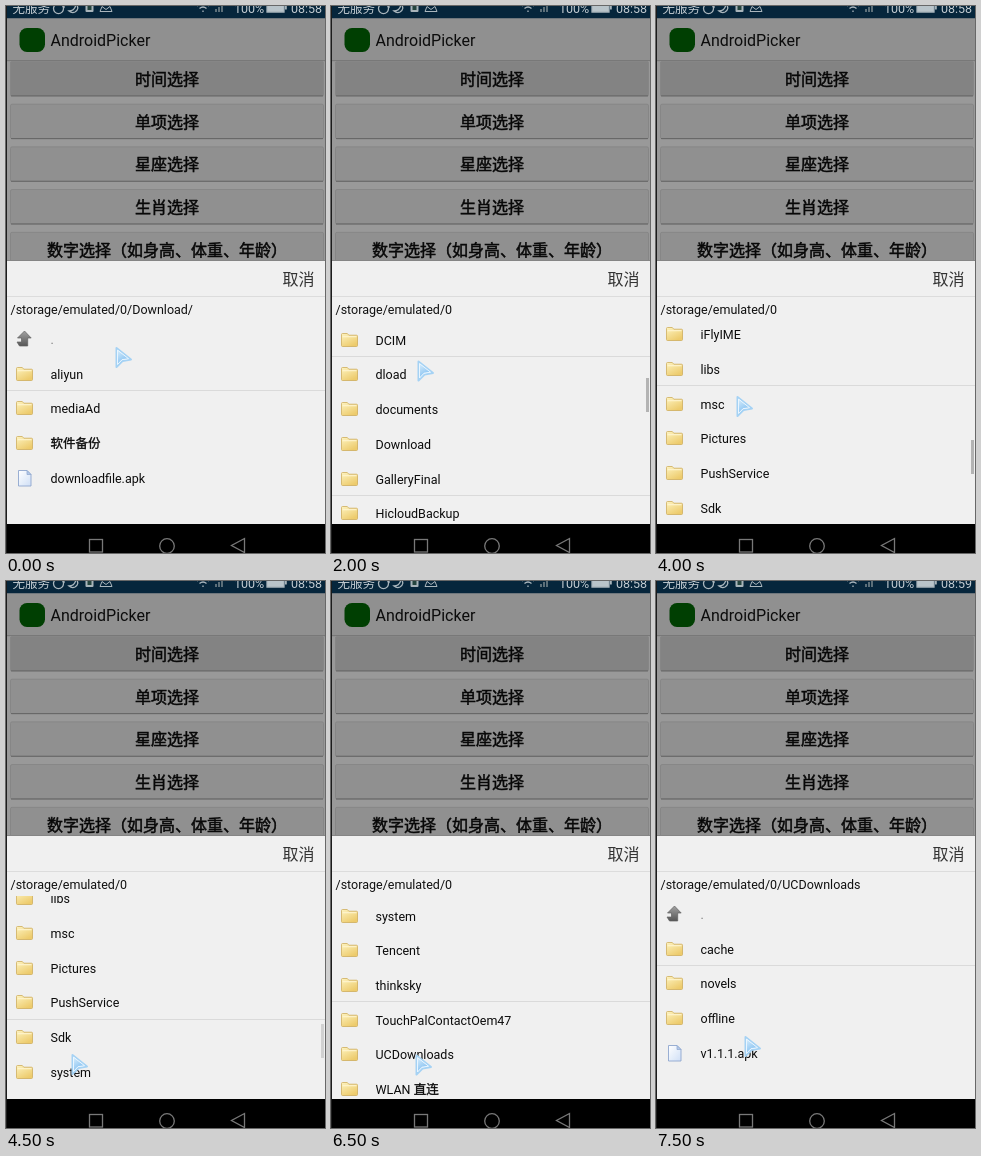
An HTML page for the animation above (8000 ms loop, 319 by 547 pixels).

```html
<!DOCTYPE html>
<html lang="zh-CN">
<head>
<meta charset="utf-8">
<title>File picker</title>
<style>
  html, body { margin: 0; width: 100%; height: 100%; overflow: hidden; background: #000; }
  svg { display: block; width: 319px; height: 547px; }
  text { font-family: Roboto, "Noto Sans CJK SC", "Noto Sans CJK", sans-serif; font-size: 12.5px; }
  .btn text { font-size: 16px; text-anchor: middle; fill: #080808; stroke: #080808; stroke-width: .5px; }
  .btn tspan { font-family: "Noto Sans CJK TC", "Noto Sans CJK", sans-serif; }
  .status text { fill: #c3ccd2; }
  .cjk { stroke: #0c0c0c; stroke-width: .35px; }
</style>
</head>
<body>
<svg id="stage" viewBox="0 0 319 547" xmlns="http://www.w3.org/2000/svg">
  <defs>
    <linearGradient id="gold" x1="0" y1="0" x2="0.6" y2="1">
      <stop offset="0" stop-color="#fdf3c0"/><stop offset="1" stop-color="#edcb6c"/>
    </linearGradient>
    <linearGradient id="page" x1="0" y1="0" x2="1" y2="1">
      <stop offset="0" stop-color="#fff"/><stop offset="1" stop-color="#cfdff6"/>
    </linearGradient>
    <linearGradient id="steel" x1="0" y1="0" x2="0" y2="1">
      <stop offset="0" stop-color="#a2a2a2"/><stop offset="1" stop-color="#565656"/>
    </linearGradient>
    <linearGradient id="ice" x1="0" y1="0" x2=".5" y2="1">
      <stop offset="0" stop-color="#d9eefc"/><stop offset="1" stop-color="#7fbdf0"/>
    </linearGradient>
    <clipPath id="listBox"><rect x="1" y="315" width="318" height="203"/></clipPath>
    <g id="folder">
      <path d="M10.500 -5.500q0 -1 1 -1h4.800l1.500 1.700h7.700q1 0 1 1v9.300q0 1 -1 1h-14q-1 0 -1 -1z" fill="url(#gold)" stroke="#cfae5e" stroke-width=".8"/>
      <path d="M11.500 -3.300h14" stroke="#fff6d2" stroke-width="1"/>
    </g>
    <g id="file">
      <path d="M12.500 -7.500h8.500l4 4v11.500h-12.500z" fill="url(#page)" stroke="#8fa6cf" stroke-width=".9"/>
      <path d="M21 -7.500v4h4z" fill="#b4c8ea" stroke="#8fa6cf" stroke-width=".7"/>
    </g>
    <g id="up">
      <path d="M18.500 -8l6.700 7h-3.500v8h-8.200l-2.500 -4h4.500v-4h-4z" fill="url(#steel)" stroke="#606060" stroke-width=".7"/>
    </g>
  </defs>

  <rect width="319" height="547" fill="#999"/>
  <g class="status">
    <rect width="319" height="12.500" fill="#06263c"/>
    <text x="6.500" y="7.300">无服务</text>
    <g fill="none" stroke="#aab6bd" stroke-width="1.300">
      <path d="M56 -1a5 5 0 1 1 -7 0M55 -1h3v3"/>
      <path d="M70 -2q4 5 -1 8q-3 1.500 -6 -1q6 0 7 -7z"/>
      <path d="M94 5.500l2 -5l4 3l4 -3l2 5z" stroke-width="1"/>
      <path d="M191 0q6 -5 12 0M193.500 2.500q3.500 -3 7 0M197 4.500v1.500"/>
      <path d="M261 -3h17v9h-17z" fill="#b9c4ca"/>
    </g>
    <rect x="79.500" y="-3" width="8" height="9" rx="1" fill="#a8b4ba"/>
    <rect x="81.500" y="0" width="4" height="4" fill="#25453f"/>
    <path d="M209 6v-3h2v3zm3 0v-5h2v5zm3 0v-8h2v8z" fill="#5c6f79"/>
    <rect x="279" y="0" width="1.800" height="3.500" fill="#a9b5bb"/>
    <text x="228" y="7">100%</text>
    <text id="clock" x="285" y="7">08:58</text>
  </g>

  <rect y="12.500" width="319" height="42" fill="#909090"/>
  <rect y="54" width="319" height="1.200" fill="#787878"/>
  <rect x="13.500" y="22" width="25.500" height="24" rx="7.500" fill="#003f02"/>
  <text x="44.500" y="40" style="font-size:16px" fill="#0c0c0c">AndroidPicker</text>
  <g class="btn" id="buttons"></g>

  <rect y="254" width="319" height="1" fill="#858585"/>
  <rect y="255" width="319" height="263" fill="#f0f0f0"/>
  <rect y="290" width="319" height="1" fill="#dcdcdc"/>
  <text x="276.500" y="279.300" style="font-size:16px" fill="#333">取消</text>
  <text id="path" x="4.500" y="307.800" fill="#111"></text>
  <g id="list" clip-path="url(#listBox)"></g>
  <rect id="thumb" x="315" width="3" height="34" fill="#b3b3b3"/>

  <rect y="518" width="319" height="29" fill="#000"/>
  <g fill="none" stroke="#787878" stroke-width="1.300">
    <rect x="83.500" y="533.500" width="13" height="12.500"/>
    <circle cx="161" cy="540" r="7.300"/>
    <path d="M238.500 532.500v14l-13 -7z"/>
  </g>
  <rect width="1" height="547" fill="#1c1c1c"/>

  <g id="cursor" stroke-linejoin="round">
    <path d="M1.500 1L16 12.500L7.500 14L1.500 20z" fill="#fff" stroke="#a5d2f4" stroke-width="2"/>
    <path d="M2.500 3L13.500 11.700L7 12.700L2.500 17.500z" fill="url(#ice)" stroke="#eef8ff" stroke-width=".9"/>
  </g>
</svg>
<script>
const $ = id => document.getElementById(id);
const ROW = 34.72, FIRST = 333, STEP = 500, LOOP = 8000;

const root = "/storage/emulated/0";
const folders = {
  download: { path: root + "/Download/", rows: [".", "aliyun", "mediaAd", "软件备份", "downloadfile.apk"] },
  home: { path: root, rows: [".", "Alarms", "Android", "backup", "Books", "cache", "CloudDrive", "data",
    "DCIM", "dload", "documents", "Download", "GalleryFinal", "HicloudBackup", "Hotspot", "HWThemes",
    "IbikeNavigator", "iFlyIME", "libs", "msc", "Pictures", "PushService", "Sdk", "system", "Tencent",
    "thinksky", "TouchPalContactOem47", "UCDownloads", "WLAN 直连"] },
  uc: { path: root + "/UCDownloads", rows: [".", "cache", "novels", "offline", "v1.1.1.apk"] }
};

// folder, scroll, first divider y, scrollbar opacity, cursor x, cursor y
const steps = [
  ["download", 0, 384, 0, 109, 341],
  ["home", 0, 384, 0, 109, 341],
  ["home", 0, 384, 0, 84, 428],
  ["home", 130, 358, 1, 85, 350],
  ["home", 277, 350, 1, 86, 354.5],
  ["home", 455, 346, 1, 95, 400],
  ["home", 514.3, 356, 1, 99, 428],
  ["home", 514.3, 356, 0, 104, 312],
  ["home", 595, 379, 1, 80, 390],
  ["home", 640.7, 438, 0.5, 65, 473],
  ["home", 762.3, 420, 1, 60, 286],
  ["home", 797, 420, 0.8, 86, 464],
  ["home", 797, 420, 0, 84, 471],
  ["home", 797, 420, 0, 84, 473.5],
  ["home", 797, 420, 0, 84, 473.5],
  ["uc", 0, 384, 0, 88, 455]
];
const PRESSED = 14;

// Traditional forms centre the brackets in their cells
const centreBrackets = s => s.replace(/[（）]/g, '<tspan lang="zh-TW">$&</tspan>');

$("buttons").innerHTML = ["时间选择", "单项选择", "星座选择", "生肖选择", "数字选择（如身高、体重、年龄）"]
  .map((label, i) => {
    const y = 55 + i * 42.7;
    return `<rect x="4.500" y="${y + 0.5}" width="313" height="34.500" rx="1.500" fill="${i ? "#909090" : "#838383"}" stroke="#868686"/>
      <rect x="5" y="${y + 34.3}" width="312" height="1.100" fill="#686868"/>
      <text x="161" y="${y + 24}">${centreBrackets(label)}</text>`;
  }).join("");

const iconFor = name => name === "." ? "up" : name.endsWith(".apk") ? "file" : "folder";

function rowMarkup(name, y) {
  const ink = name === "." ? "#777" : "#0c0c0c";
  const text = name.replace(/[\u4e00-\u9fff]+/g, '<tspan class="cjk">$&</tspan>');
  return `<use href="#${iconFor(name)}" y="${y}"/><text x="44.500" y="${y + 4.6}" fill="${ink}">${text}</text>`;
}

function show(n) {
  const [key, scroll, line, bar, x, y] = steps[n];
  const { path, rows } = folders[key];
  let out = n === PRESSED ? '<rect x="1" y="456" width="318" height="34" fill="#bfbfbf"/>' : "";
  for (let d = line; d < 518; d += 139) out += `<rect x="1" y="${d}" width="318" height="1" fill="#dadada"/>`;
  rows.forEach((name, i) => {
    const cy = Math.round(FIRST + i * ROW - scroll);
    if (cy > 300 && cy < 530) out += rowMarkup(name, cy);
  });
  $("list").innerHTML = out;
  $("path").textContent = path;
  $("clock").textContent = n < PRESSED ? "08:58" : "08:59";
  $("thumb").setAttribute("y", Math.round(318 + scroll / 5.12));
  $("thumb").setAttribute("opacity", bar);
  $("cursor").setAttribute("transform", `translate(${x} ${y})`);
}

let shown = -1;
const start = performance.now();
function tick() {
  const n = Math.floor((performance.now() - start) % LOOP / STEP);
  if (n !== shown) show(shown = n);
  requestAnimationFrame(tick);
}
tick();
</script>
</body>
</html>
```
